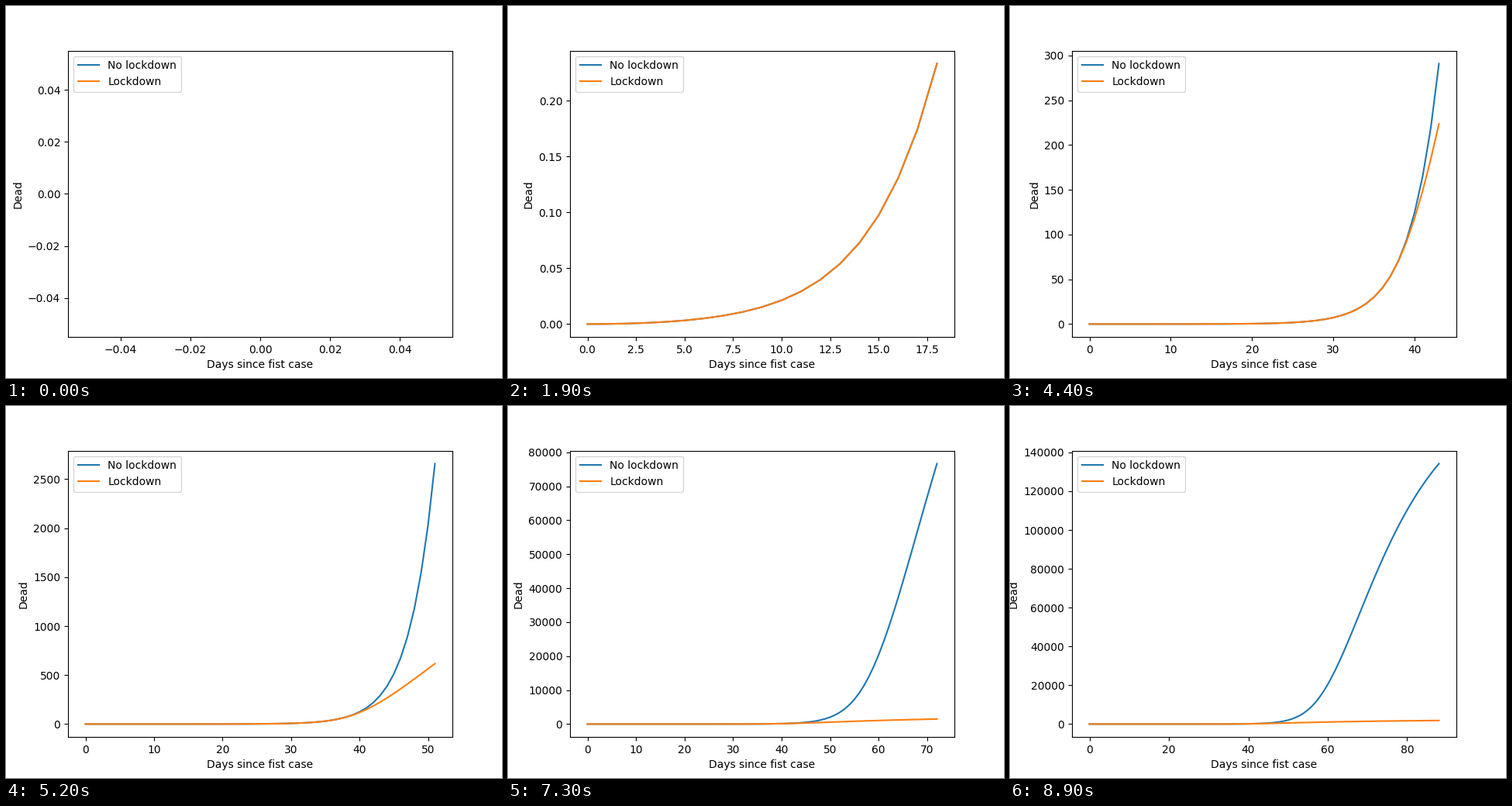
These frames come from a looping animation (640 px wide and 480 px high, 9 s). A matplotlib script:

```python
import numpy as np
import matplotlib.pyplot as plt
from matplotlib.animation import FuncAnimation

FRAMES = 90
POPULATION = 11.73e6
FATALITY = 0.01528
CONTACT = 0.342    # infections per case and day
RECOVERY = 0.057   # share of cases resolved per day
OUTCOME = 0.24     # share of resolved cases counted per day
LOCK_DAY, LOCK_TIME, LOCK_DROP = 36, 4, 0.32
SUBSTEPS = 10


def free_contact(t):
    return CONTACT


def locked_contact(t):
    since = max(t - LOCK_DAY, 0)
    return CONTACT - LOCK_DROP * (1 - np.exp(-since / LOCK_TIME))


def flow(t, state, contact):
    """Rates of change for susceptible, infected, resolved and counted."""
    s, i, r, _ = state
    caught, resolved, counted = contact(t) * s * i, RECOVERY * i, OUTCOME * r
    return np.array([-caught, caught - resolved, resolved - counted, counted])


def death_toll(contact):
    """Dead on each day, starting from a single case (Runge-Kutta)."""
    h = 1 / SUBSTEPS
    state = np.array([1 - 1 / POPULATION, 1 / POPULATION, 0, 0])
    toll = []
    for step in range(FRAMES * SUBSTEPS):
        if step % SUBSTEPS == 0:
            toll.append(state[3] * POPULATION * FATALITY)
        t = step * h
        k1 = flow(t, state, contact)
        k2 = flow(t + h / 2, state + h / 2 * k1, contact)
        k3 = flow(t + h / 2, state + h / 2 * k2, contact)
        k4 = flow(t + h, state + h * k3, contact)
        state = state + h / 6 * (k1 + 2 * k2 + 2 * k3 + k4)
    return np.array(toll)


days = np.arange(FRAMES)
free = death_toll(free_contact)
locked = death_toll(locked_contact)

fig, ax = plt.subplots(figsize=(6.4, 4.8), dpi=100)
free_line, = ax.plot([], [], label="No lockdown")
locked_line, = ax.plot([], [], label="Lockdown")
ax.set_xlabel("Days since fist case")
ax.set_ylabel("Dead")
ax.legend(loc="upper left")


def update(frame):
    n = max(frame, 1)
    free_line.set_data(days[:n], free[:n])
    locked_line.set_data(days[:n], locked[:n])
    ax.relim()
    ax.autoscale_view()
    return free_line, locked_line


anim = FuncAnimation(fig, update, frames=FRAMES, interval=100,
                     repeat=True, repeat_delay=0)
plt.show()
```
